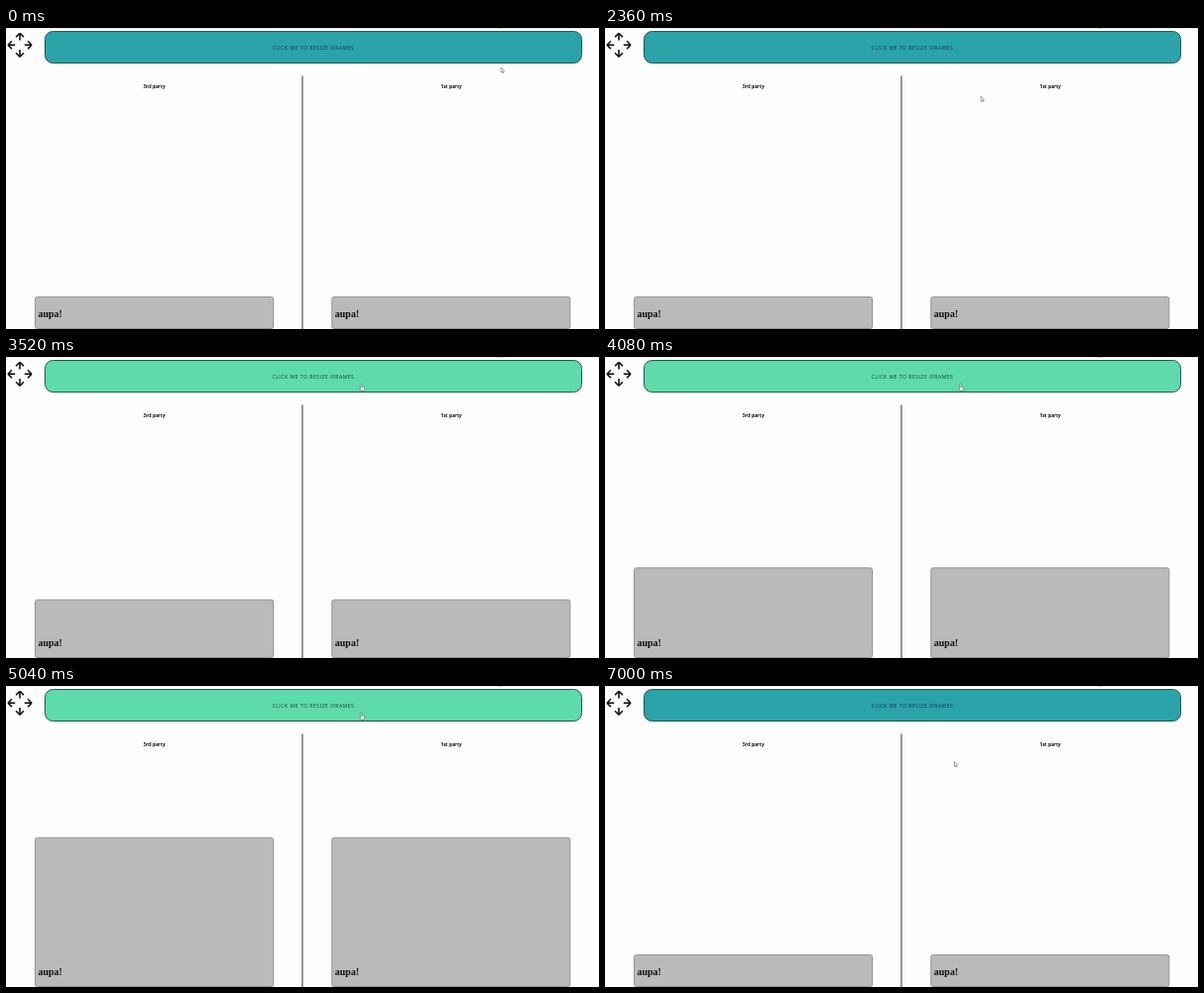
Animation of 600 by 305 pixels, one loop 7.04 s. Source, as an HTML page with a canvas:

```html
<!DOCTYPE html>
<html lang="en">
<head>
<meta charset="utf-8">
<title>Resize iframes</title>
<style>
  html, body { margin: 0; width: 100%; height: 100%; overflow: hidden; background: #fefdfe; }
  canvas { display: block; width: 600px; height: 305px; }
</style>
</head>
<body>
<canvas id="stage"></canvas>
<script>
const W = 600, H = 305, LOOP = 7040;
const canvas = document.getElementById('stage');
const ctx = canvas.getContext('2d');
const ratio = window.devicePixelRatio || 1;
canvas.width = W * ratio;
canvas.height = H * ratio;

const GROW = { start: 2400, length: 3830, from: 272.5, rise: 148.5 };
const STALL = { from: 4400, to: 4760 };
const HOVER = { on: 2430, off: 6650, fade: 240 };
const REST = { x: 501, y: 40 };
const MOVES = [
  { start: 1320, end: 2360, x: 380.5, y: 69.5 },
  { start: 2360, end: 2480, x: 359, y: 27 },
  { start: 6600, end: 7000, x: 353.5, y: 76.5 }
];

const mix = (a, b, k) => a + (b - a) * k;
const progress = (t, start, length) => Math.max(0, Math.min(1, (t - start) / length));

// cubic-bezier(.42, 0, .58, 1), solved for its parameter by bisection
function easeInOut(x) {
  let lo = 0, hi = 1;
  for (let i = 0; i < 24; i++) {
    const s = (lo + hi) / 2, r = 1 - s;
    const bx = 1.26 * s * r * r + 1.74 * s * s * r + s * s * s;
    if (bx < x) lo = s; else hi = s;
  }
  return lo * lo * (3 - 2 * lo);
}

// The panels grow, then snap back to their first height.
function panelTop(t) {
  if (t >= STALL.from && t < STALL.to) t = STALL.from;
  const k = progress(t, GROW.start, GROW.length);
  return GROW.from - (k < 1 ? GROW.rise * easeInOut(k) : 0);
}

function pointerAt(t) {
  let { x, y } = REST;
  for (const m of MOVES) {
    const k = progress(t, m.start, m.end - m.start);
    x = mix(x, m.x, k);
    y = mix(y, m.y, k);
  }
  return { x, y };
}

function line(x1, y1, x2, y2, width, color) {
  ctx.beginPath();
  ctx.moveTo(x1, y1);
  ctx.lineTo(x2, y2);
  ctx.lineWidth = width;
  ctx.strokeStyle = color;
  ctx.stroke();
}

function paint(fill, stroke, width) {
  ctx.fillStyle = fill;
  ctx.fill();
  ctx.lineWidth = width;
  ctx.strokeStyle = stroke;
  ctx.stroke();
}

function box(x, y, w, h, r, fill, stroke, width = 1) {
  ctx.beginPath();
  ctx.roundRect(x, y, w, h, r);
  paint(fill, stroke, width);
}

function label(str, x, y, font, color, align = 'left', spacing = 0) {
  ctx.font = font;
  ctx.textAlign = align;
  ctx.letterSpacing = spacing + 'px';
  ctx.fillStyle = color;
  ctx.fillText(str, x, y);
}

function moveIcon() {
  const tip = -12, wing = 3.9;
  for (let i = 0; i < 4; i++) {
    ctx.save();
    ctx.translate(14, 17.2);
    ctx.rotate(i * Math.PI / 2);
    line(0, -4.8, 0, tip, 1.6, '#101010');
    for (const side of [-1, 1]) line(0, tip, side * wing, tip + wing, 1.6, '#101010');
    ctx.restore();
  }
}

function button(t) {
  const k = progress(t, HOVER.on, HOVER.fade) - progress(t, HOVER.off, HOVER.fade);
  const fill = `rgb(${mix(42, 94, k)}, ${mix(163, 219, k)}, ${mix(169, 170, k)})`;
  box(39.5, 3.5, 543, 32, 8, fill, '#235650');
  label('CLICK ME TO RESIZE IFRAMES', 269.5, 21.8, '5px "Open Sans", sans-serif', '#12383a', 'left', 0.56);
}

function column(x, title, top) {
  label(title, x + 120.6, 60.5, 'bold 4.8px "Open Sans", sans-serif', '#101010', 'center');
  box(x, top, 241, 304.5 - top, 2, '#bababa', '#969696');
  label('aupa!', x + 3, 292.8, 'bold 10px "Liberation Serif", serif', '#0c0c0c');
}

function arrow() {
  ctx.beginPath();
  ctx.moveTo(0, 0);
  ctx.lineTo(0, 5);
  ctx.lineTo(3.5, 3.6);
  ctx.closePath();
  paint('#fff', '#66666e', 0.6);
  line(1.4, 4, 2.3, 5.8, 0.9, '#66666e');
}

function hand() {
  box(-0.6, 3, 4.2, 4, 1.2, '#fff', '#55555f', 0.6);
  box(0, 0, 1.3, 4, 0.6, '#fff', '#55555f', 0.5);
}

function pointer(t) {
  const { x, y } = pointerAt(t);
  ctx.save();
  ctx.translate(x, y);
  if (y > 3 && y < 36) hand(); else arrow();
  ctx.restore();
}

function draw(t) {
  ctx.setTransform(ratio, 0, 0, ratio, 0, 0);
  ctx.fillStyle = '#fefdfe';
  ctx.fillRect(0, 0, W, H);
  line(0, 0, W, 0, 1, '#ececec');
  line(498, 0, 503, 0, 1, '#d8b8a8');

  moveIcon();
  button(t);
  line(299.9, 48.5, 299.9, H, 1.3, '#606060');

  const top = panelTop(t);
  column(29.5, '3rd party', top);
  column(329.8, '1st party', top);
  pointer(t);
}

const begin = performance.now();
function tick() {
  draw((performance.now() - begin) % LOOP);
  requestAnimationFrame(tick);
}
tick();
</script>
</body>
</html>
```
